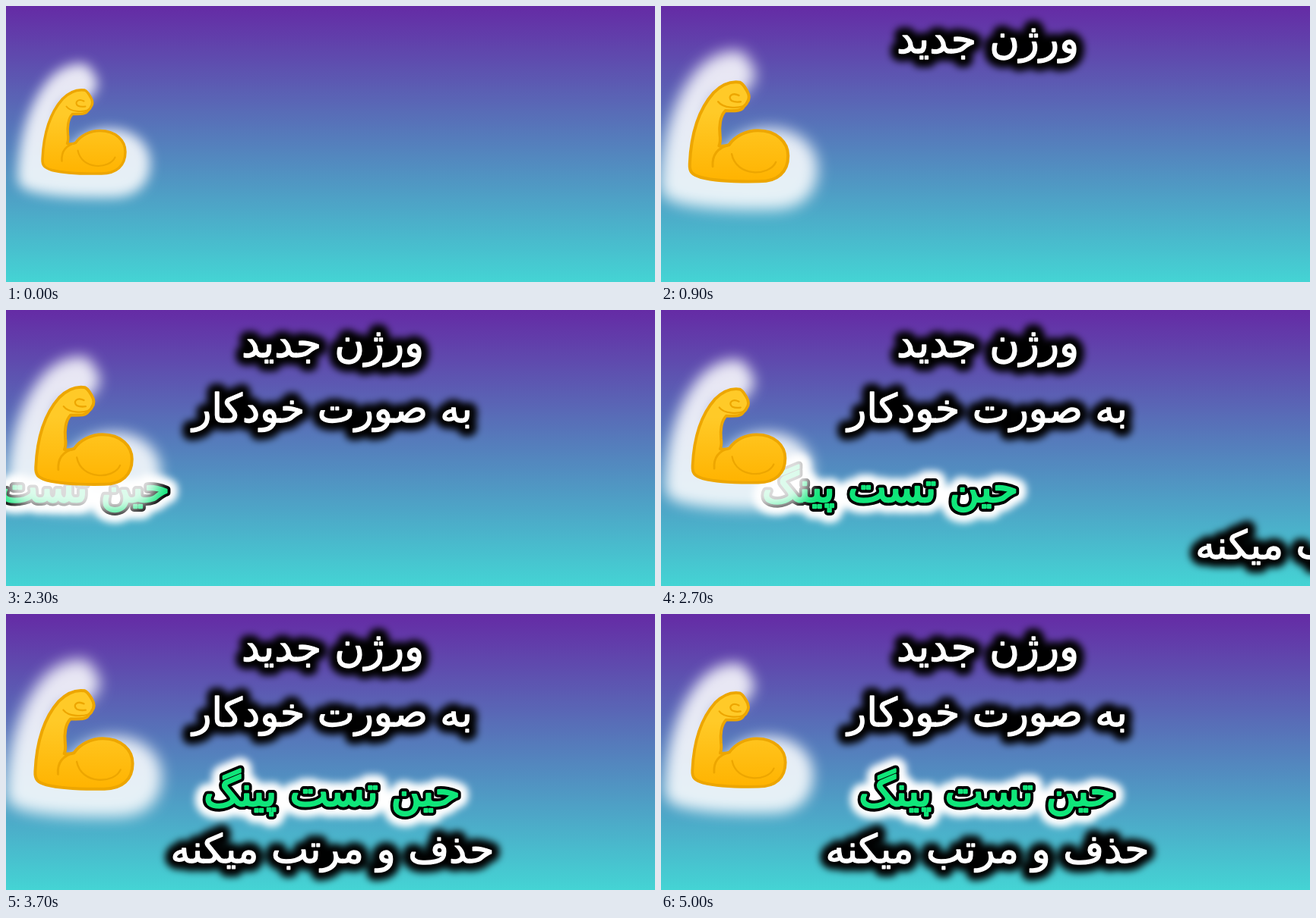
Animation, 854 px wide and 364 px high, one loop 5.1 s. Source, as an HTML page:

```html
<!DOCTYPE html>
<html lang="fa">
<head>
<meta charset="utf-8">
<style>
  html, body { margin: 0; width: 100%; height: 100%; overflow: hidden; }
  svg { display: block; width: 100vw; height: 100vh; }
  text { font-family: "DejaVu Sans", sans-serif; text-anchor: middle; direction: rtl; stroke-linejoin: round; }
  .line { fill: none; stroke: #eda600; stroke-width: 3.4; stroke-linecap: round; stroke-linejoin: round; }
</style>
</head>
<body>
<svg id="stage" viewBox="0 0 854 364">
  <defs>
    <linearGradient id="sky" x2="0" y2="1">
      <stop stop-color="#652ba5"/><stop offset="1" stop-color="#44d4d4"/>
    </linearGradient>
    <linearGradient id="skin" x2="0" y2="1">
      <stop offset=".3" stop-color="#ffca28"/><stop offset="1" stop-color="#ffb300"/>
    </linearGradient>
    <filter id="soft" x="-30%" y="-60%" width="160%" height="220%"><feGaussianBlur stdDeviation="5"/></filter>
    <path id="arm" d="M104 113.500C108 115 110 120 112 123C115 128 115 132 112 136C111 139 109 139 108 141
      C105 146 97 145 88 145C82 151 81 163 82 172Q83 179 81 184Q87 185 92 183C99 173 111 167 124 167
      C145 167 157.500 180 157.500 195C157.500 213 146 223.500 126 223.500C101 224 77 223 61 219
      C51 216 48 213 48.500 204C50 170 59 143 75 125C84 116 94 112 104 113.500Z"/>
  </defs>
  <rect width="854" height="364" fill="url(#sky)"/>
  <g id="lines"></g>
  <g id="flex">
    <use href="#arm" transform="translate(103 167) scale(1.6) translate(-103 -168.500)" fill="#fff" opacity=".86" filter="url(#soft)"/>
    <use href="#arm" fill="url(#skin)"/>
    <g class="line">
      <use href="#arm"/>
      <path d="M92 183C80 186 73 193 74 207" stroke-width="2.500"/>
      <path d="M95 193C100 219 137 218 144 202" stroke-width="2"/>
      <path d="M80 135C86 143 102 142 108 140M103 128C95 124 90 130 95 134Q99 136 105 135" stroke-width="2"/>
    </g>
  </g>
</svg>
<script>
const LOOP = 5100, STEP = 100, SPEED = 0.637;
const svgNS = "http://www.w3.org/2000/svg";

// side: -1 enters from the left, 1 from the right
const lines = [
  { text: "ورژن جدید", size: 54, x: 430, y: 62, side: -1, arrive: 900 },
  { text: "به صورت خودکار", size: 52, x: 429.5, y: 148, side: 1, arrive: 1900 },
  { text: "حین تست پینگ", size: 54, x: 429, y: 253, side: -1, arrive: 2900, bright: true },
  { text: "حذف و مرتب میکنه", size: 52, x: 429.5, y: 328, side: 1, arrive: 3464 }
];

function layer(parent, line, color, width, blur) {
  const el = document.createElementNS(svgNS, "text");
  const attrs = { x: line.x, y: line.y, "font-size": line.size, fill: color, stroke: color, "stroke-width": width };
  if (blur) attrs.filter = "url(#soft)";
  for (const name in attrs) el.setAttribute(name, attrs[name]);
  el.textContent = line.text;
  parent.append(el);
}

for (const line of lines) {
  line.node = document.createElementNS(svgNS, "g");
  layer(line.node, line, line.bright ? "#fff" : "#000", line.bright ? 30 : 22, true);
  if (line.bright) layer(line.node, line, "#000", 10);
  layer(line.node, line, line.bright ? "#10e67a" : "#fff", line.bright ? 2.4 : 1.4);
  document.getElementById("lines").append(line.node);
}

// arm width over time
const pulse = [
  [0, 112], [600, 127], [900, 133], [1400, 140], [1750, 140.5], [2300, 130], [2800, 124],
  [3200, 126], [3600, 130], [4200, 140], [4300, 144], [4800, 131], [5100, 123]
];

function armWidth(t) {
  const i = pulse.findIndex(([time]) => time > t);
  const [t0, w0] = pulse[i - 1], [t1, w1] = pulse[i];
  return w0 + (w1 - w0) * (t - t0) / (t1 - t0);
}

const flex = document.getElementById("flex");

function draw() {
  const t = Math.floor(performance.now() % LOOP / STEP) * STEP;
  for (const { node, side, arrive } of lines) {
    const offset = side * SPEED * Math.max(0, arrive - t);
    node.setAttribute("transform", `translate(${offset} 0)`);
    node.setAttribute("visibility", Math.abs(offset) > 680 ? "hidden" : "visible");
  }
  flex.setAttribute("transform", `translate(102.5 166) scale(${armWidth(t) / 112}) translate(-103 -168.5)`);
  requestAnimationFrame(draw);
}
draw();
</script>
</body>
</html>
```
